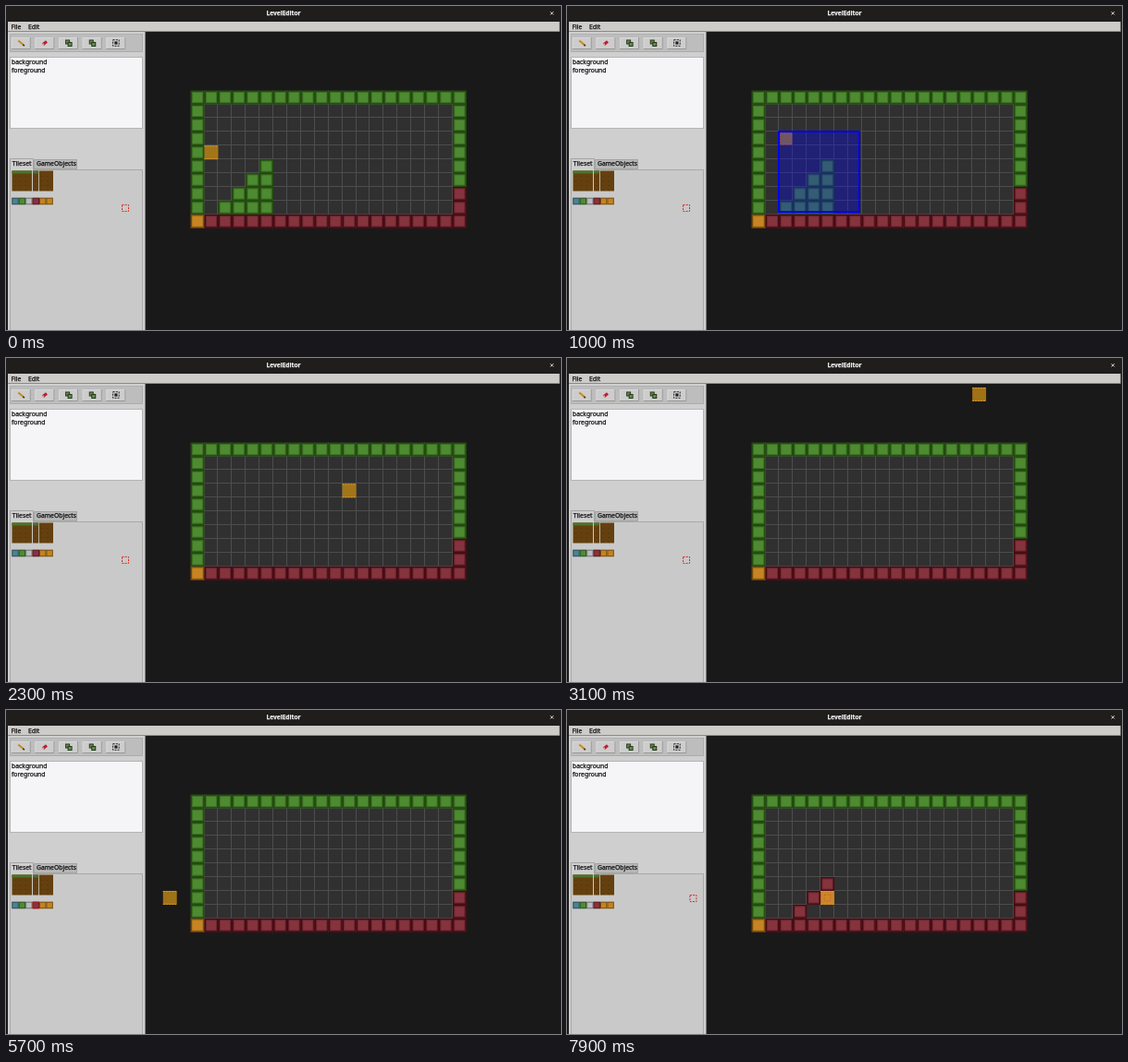
An HTML page with a canvas for the animation above (8 s loop, 600 by 351 pixels).

```html
<!DOCTYPE html>
<html lang="en">
<head>
<meta charset="utf-8">
<title>LevelEditor</title>
<style>
html, body { margin: 0; height: 100%; overflow: hidden; background: #1a1919; }
canvas { display: block; }
</style>
</head>
<body>
<canvas id="stage" width="600" height="351"></canvas>
<script>
const ctx = document.getElementById('stage').getContext('2d');
const LOOP = 8000, STEP = 100;
const CELL = 14.91, LEFT = 199.6, TOP = 91.6, COLS = 20, ROWS = 10;

// face, outer border, inner border
const GREEN = ['#4d8a31', '#234b0f', '#3b7322'];
const RED = ['#85343d', '#470a13', '#702630'];
const ORANGE = ['#c68423', '#75490b', '#b5761c'];

// Pointer path in grid cells: time, column, row
const path = [
  [0, 1, 4], [200, 1, 4], [300, 2, 3], [900, 7, 8], [1200, 7, 8], [1600, 10, 5],
  [2100, 10, 5], [3000, 16, -4], [3400, 16, -4], [4100, 3, 9], [4700, 3, 9],
  [5400, -2, 7], [6200, -2, 7], [6300, 1, 8], [6500, 3, 8], [6700, 3, 8],
  [6900, 4, 7], [7100, 4, 7], [7300, 5, 6], [7600, 5, 6], [7700, 5, 7], [LOOP, 5, 7]
];
const painted = [[6600, 3, 8], [6900, 4, 7], [7300, 5, 6], [7700, 5, 7]];
const DRAG_START = 300, ERASE = 1200;

function rect(x, y, w, h, color) {
  ctx.fillStyle = color;
  ctx.fillRect(x, y, w, h);
}

function frame(x, y, w, h, color, width = 1) {
  ctx.strokeStyle = color;
  ctx.lineWidth = width;
  ctx.strokeRect(x + width / 2, y + width / 2, w - width, h - width);
}

function dashed(x, y, size, color) {
  ctx.setLineDash([2, 1.2]);
  frame(x, y, size, size, color);
  ctx.setLineDash([]);
}

function line(color, width, ...points) {
  ctx.strokeStyle = color;
  ctx.lineWidth = width;
  ctx.beginPath();
  points.forEach(([x, y]) => ctx.lineTo(x, y));
  ctx.stroke();
}

// A hairline stroke gives the regular weight a medium look
function label(text, x, y, color = '#111', font = '6.8px') {
  ctx.font = font + ' "Noto Sans", sans-serif';
  ctx.fillStyle = ctx.strokeStyle = color;
  ctx.lineWidth = .25;
  ctx.fillText(text, x, y);
  ctx.strokeText(text, x, y);
}

const cellX = col => LEFT + col * CELL;
const cellY = row => TOP + row * CELL;

function tile(col, row, [face, outer, inner]) {
  const x = cellX(col), y = cellY(row);
  rect(x, y, CELL, CELL, outer);
  rect(x + 1.4, y + 1.4, CELL - 2.8, CELL - 2.8, inner);
  rect(x + 2.4, y + 2.4, CELL - 4.8, CELL - 4.8, face);
}

function bevel(x, y, w, h, fill, light = '#e2e2e2', dark = '#999') {
  rect(x, y, w, h, fill);
  line(light, 1, [x + .5, y + h - 1], [x + .5, y + .5], [x + w - 1, y + .5]);
  line(dark, 1, [x + w - .5, y], [x + w - .5, y + h - .5], [x, y + h - .5]);
}

function toolbar() {
  bevel(4, 30, 144, 20, '#bdbdbd', '#b0b0b0', '#acacac');
  const icons = [
    x => {
      line('#c98b1e', 2.2, [x - 3, 37.5], [x + 2.5, 42]);
      line('#3a2a12', 1.6, [x + 2, 41.8], [x + 3.6, 43.2]);
    },
    x => {
      line('#b9202e', 3.2, [x - 2, 41.8], [x + 2, 38.4]);
      line('#e8a9a9', 2, [x - 2.6, 42.2], [x - 1.2, 41]);
    },
    copies, copies,
    x => {
      rect(x - 1.6, 38.4, 3.2, 3.2, '#222');
      dashed(x - 3.8, 36.2, 7.6, '#222');
    }
  ];
  icons.forEach((icon, i) => {
    const x = 16.3 + i * 25.65;
    bevel(x - 10.5, 34, 21, 13, '#cdcdcd', '#d8d8d8');
    icon(x);
  });
}

function copies(x) {
  for (const d of [-3.5, -1]) {
    rect(x + d, 40 + d, 5, 5, '#26391d');
    rect(x + d + 1, 41 + d, 3, 3, '#64904b');
  }
}

function palette() {
  bevel(4, 177, 144, 180, '#c9c9c9', '#aaa', '#aaa');
  for (const [x, w] of [[6.5, 21.5], [29, 6.2], [36, 15]]) {
    rect(x, 178.5, w, 22, '#65400f');
    if (x < 36) rect(x, 178.5, w, 3, '#47752a');
    for (let y = 184; y < 200; y += 5) {
      for (let dx = 2; dx < w - 2; dx += 6) rect(x + dx, y, 2, 1, '#593709');
    }
  }
  ['#4c8291', '#4b8c35', '#b9bcbc', '#8d303c', '#c4821f', '#c4821f'].forEach((color, i) => {
    const x = 6.3 + i * 7.42;
    rect(x, 207.7, 7.42, 7.5, color);
    frame(x, 207.7, 7.42, 7.5, 'rgba(0,0,0,.4)');
  });
}

function chrome() {
  rect(0, 0, 600, 351, '#1a1919');
  rect(0, 0, 600, 17, '#1f1e1c');
  ctx.textAlign = 'center';
  label('LevelEditor', 300, 10.4, '#eee', 'bold 6.6px');
  ctx.textAlign = 'left';
  line('#ddd', 1, [588.6, 6.2], [591.8, 9.4]);
  line('#ddd', 1, [591.8, 6.2], [588.6, 9.4]);
  rect(2, 17, 149, 334, '#cfcfcf');
  rect(2, 17, 596.5, 10.5, '#cdccc8');
  rect(2, 27, 596.5, 1, '#8a8a8a');
  label('File', 5.5, 24.7);
  label('Edit', 24, 24.7);
  toolbar();
  rect(4, 55, 144, 78, '#f5f4f6');
  frame(4, 55, 144, 78, '#b4b4b4');
  label('background', 6, 62.5);
  label('foreground', 6, 71.7);
  palette();
  bevel(30, 166, 47, 11, '#b8b8b8', '#a4a4a4', '#a4a4a4');
  rect(4, 165, 25.5, 13, '#cfcfcf');
  line('#a4a4a4', 1, [4.5, 178], [4.5, 165.5], [29.5, 165.5], [29.5, 177]);
  label('Tileset', 6.8, 173.2);
  label('GameObjects', 33, 173.2);
  rect(150, 28, 1, 323, '#777');
}

function level(t) {
  rect(LEFT, TOP, COLS * CELL, ROWS * CELL, '#303030');
  for (let c = 1; c < COLS; c++) rect(Math.round(cellX(c)) - 1, TOP, 1, ROWS * CELL, '#4d4d4d');
  for (let r = 1; r < ROWS; r++) rect(LEFT, Math.round(cellY(r)) - 1, COLS * CELL, 1, '#4d4d4d');
  for (let c = 0; c < COLS; c++) {
    tile(c, 0, GREEN);
    tile(c, 9, c ? RED : ORANGE);
  }
  for (let r = 1; r < 9; r++) {
    tile(0, r, GREEN);
    tile(19, r, r < 7 ? GREEN : RED);
  }
  if (t < ERASE) {
    for (let r = 5; r < 9; r++) for (let c = 10 - r; c < 6; c++) tile(c, r, GREEN);
  }
  for (const [when, c, r] of painted) if (t >= when) tile(c, r, RED);
}

function pointerAt(t) {
  const i = path.findIndex(p => p[0] > t);
  const [t0, c0, r0] = path[i - 1], [t1, c1, r1] = path[i];
  const k = (t - t0) / (t1 - t0);
  return [Math.round(c0 + (c1 - c0) * k), Math.round(r0 + (r1 - r0) * k)];
}

function selection(col, row) {
  const x = cellX(2), y = cellY(3);
  const w = (col - 1) * CELL - 2, h = (row - 2) * CELL - 2;
  rect(x, y, w, h, 'rgba(0,0,255,.33)');
  rect(x + 1, y + 1, CELL - 2, CELL - 2, '#6f5664');
  dashed(x + 1, y + 1, CELL - 2, '#a34a5c');
  frame(Math.round(x) - 1, Math.round(y) - 1, Math.round(w) + 2, Math.round(h) + 2, '#00f', 2);
}

function ghost(col, row) {
  const x = cellX(col), y = cellY(row);
  const onTile = row === 9 || painted.some(([, c, r]) => c === col && r === row);
  rect(x, y, CELL, CELL, onTile ? 'rgba(214,146,38,.9)' : 'rgba(184,130,22,.85)');
  ctx.setLineDash([2, 1]);
  line('#d79c39', 1, [x, y + .5], [x + CELL, y + .5]);
  line('#d79c39', 1, [x, y + CELL - .5], [x + CELL, y + CELL - .5]);
  ctx.setLineDash([]);
  if (onTile) dashed(x + 3.5, y + 3.5, CELL - 7, 'rgba(200,80,50,.6)');
}

function marker(t) {
  const [c, r] = t < 5500 ? [16, 1] : t < 5600 ? [10, 0] : t < 6200 ? [3, 0] : [17, -1];
  dashed(6.3 + c * 7.42, 207.5 + r * 7.42, 8, '#d8281c');
}

function draw(now) {
  const t = Math.floor(now % LOOP / STEP) * STEP;
  const [col, row] = pointerAt(t);
  chrome();
  level(t);
  if (t >= DRAG_START && t < ERASE) selection(col, row);
  else ghost(col, row);
  marker(t);
}

const start = performance.now();
function tick() {
  draw(performance.now() - start);
  requestAnimationFrame(tick);
}
tick();
</script>
</body>
</html>
```
